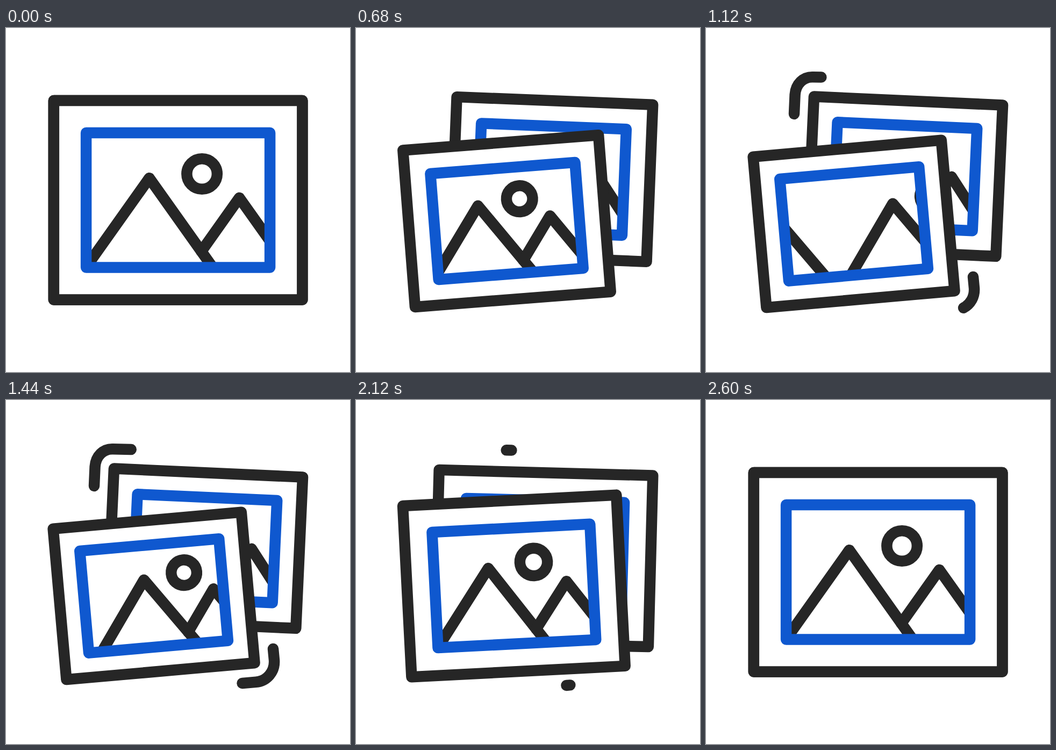
An HTML page for the animation above (2800 ms loop, 640 px wide and 640 px high).

```html
<!DOCTYPE html>
<html lang="en">
<head>
<meta charset="utf-8">
<title>Photo cards</title>
<style>
  html, body { margin: 0; width: 100%; height: 100%; overflow: hidden; background: #fff; }
  svg { display: block; width: 100%; height: 100%; }
</style>
</head>
<body>
<svg viewBox="0 0 640 640" fill="none" stroke="#262626" stroke-width="20.5"
     stroke-linejoin="round" stroke-linecap="round">
  <defs>
    <clipPath id="window"><rect x="-171" y="-125.25" width="342" height="250.5"/></clipPath>
    <g id="hills">
      <path d="M-182 140 L-53.5 -41 L75 140"/>
      <path d="M43.2 95.5 L114 -4.3 L216.5 140"/>
    </g>
  </defs>
  <path class="swoosh" d="M164 160 L165.6 124 C167 104 181 90.5 199 91.2 L290 93.6"/>
  <path class="swoosh" d="M497 463 L499 484 C500.5 506 485 523 465 524.8 L391 531"/>
</svg>
<script>
const LOOP = 2800, STEP = 40, LINE = 20.5, SCROLL = 437;
const svg = document.querySelector('svg');

const lerp = (a, b, k) => a + (b - a) * k;
const clamp = v => Math.min(1, Math.max(0, v));

// cubic-bezier(.593, 0, .136, 1), solved by bisection
function ease(x) {
  if (x <= 0 || x >= 1) return clamp(x);
  let lo = 0, hi = 1, s;
  for (let i = 0; i < 30; i++) {
    s = (lo + hi) / 2;
    const q = 1 - s;
    if (3 * s * q * q * .593 + 3 * s * s * q * .136 + s * s * s < x) lo = s; else hi = s;
  }
  return s * s * (3 - 2 * s);
}
const tween = (t, start, length) => ease((t - start) / length);

function add(parent, tag, attrs = {}) {
  const el = document.createElementNS('http://www.w3.org/2000/svg', tag);
  for (const k in attrs) el.setAttribute(k, attrs[k]);
  return parent.appendChild(el);
}

function box(parent, w, h, attrs) {
  return add(parent, 'rect', { x: -w / 2, y: -h / 2, width: w, height: h, ...attrs });
}

function makeCard(dx, dy, turn) {
  const root = add(svg, 'g');
  box(root, 462.5, 370.5, { fill: '#fff' });
  const view = add(root, 'g', { 'clip-path': 'url(#window)' });
  const scenes = [0, 1].map(() => {
    const g = add(view, 'g');
    add(g, 'use', { href: '#hills' });
    return { g, sun: add(g, 'circle') };
  });
  box(root, 342, 250.5, { stroke: '#0f58cf' });

  return (open, scroll) => {
    const size = lerp(1, .76, open), shrink = 1 - size;
    root.setAttribute('transform',
      `translate(${320.1 + dx * open} ${320.2 + dy * open}) rotate(${turn * open}) scale(${size})`);
    root.setAttribute('stroke-width', LINE / size);
    scenes.forEach(({ g, sun }, i) => {
      g.setAttribute('transform', `translate(${SCROLL * (i - scroll)} 0)`);
      sun.setAttribute('cx', 44.5 + 5 * shrink);
      sun.setAttribute('cy', -48.7 - 6 * shrink);
      sun.setAttribute('r', (28.25 - 18.5 * shrink) / size);
    });
  };
}

const drawBack = makeCard(50, -44, 2.6);
const drawFront = makeCard(-45, 44.2, -5.05);

const swooshes = [...document.querySelectorAll('.swoosh')].map(el => ({ el, len: el.getTotalLength() }));
swooshes.forEach(s => svg.appendChild(s.el));

function trim({ el, len }, from, to) {
  const shown = (to - from) * len;
  el.style.display = shown > .5 ? '' : 'none';
  el.setAttribute('stroke-dasharray', `${Math.max(shown, .1)} 9999`);
  el.setAttribute('stroke-dashoffset', -from * len);
}

function render(t) {
  const open = tween(t, 200, 800) - tween(t, 1830, 770);
  drawBack(open, 0);
  drawFront(open, tween(t, 468, 1460));

  const leave = tween(t, 1780, 400);
  trim(swooshes[0], tween(t, 1548, 820), .68 * tween(t, 700, 740) + .32 * leave);
  trim(swooshes[1], tween(t, 1607, 713), .69 * tween(t, 800, 740) + .31 * leave);
}

const began = performance.now();
function tick() {
  const t = (performance.now() - began) % LOOP;
  render(Math.floor(t / STEP) * STEP);
  requestAnimationFrame(tick);
}
tick();
</script>
</body>
</html>
```
